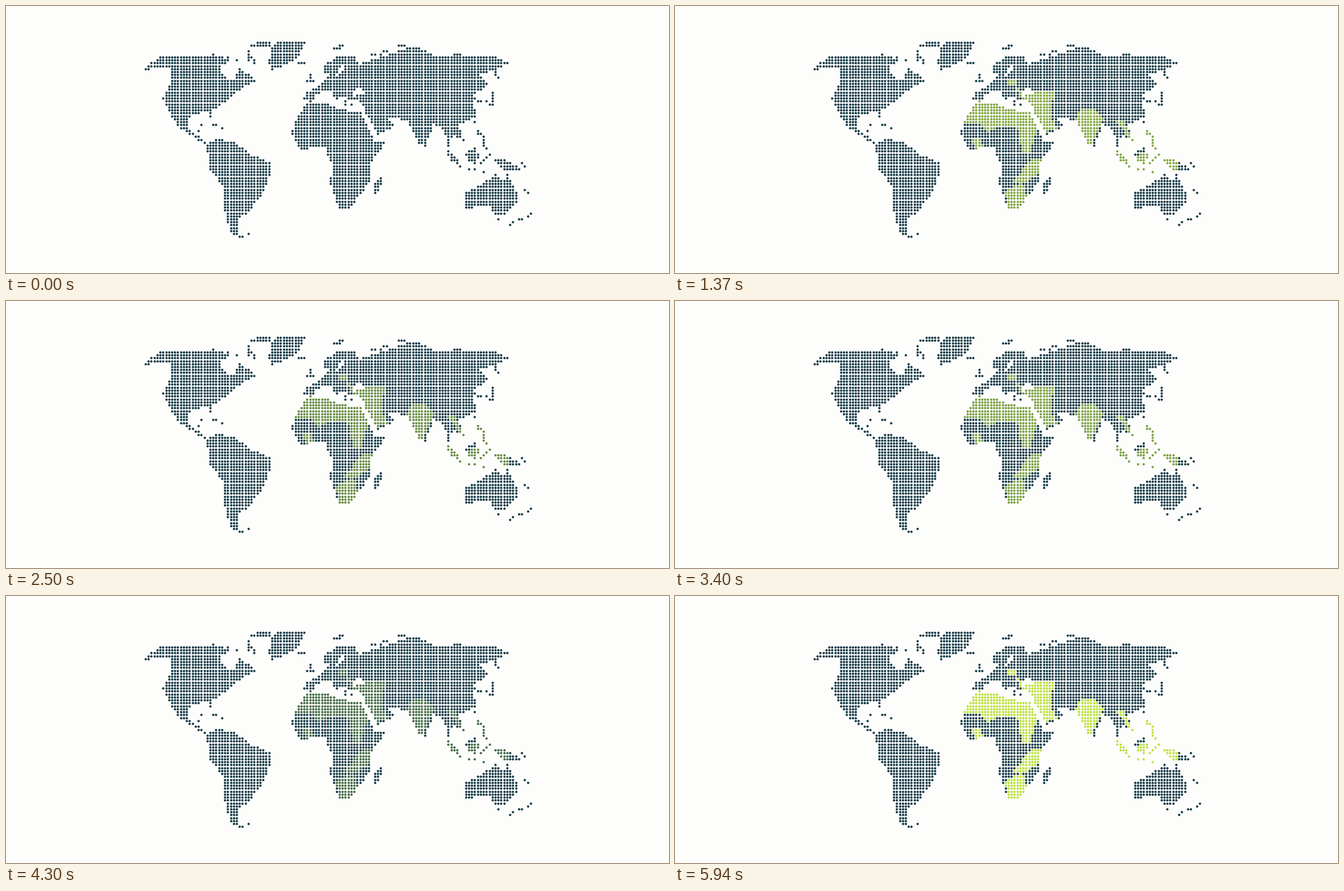
Write a matplotlib script that moves like this. It is 1179 px wide and 475 px high and loops after 5970 ms.

```python
import numpy as np
import matplotlib.pyplot as plt
from matplotlib.animation import FuncAnimation
from matplotlib.path import Path

W, H, DPI = 1179, 475, 100
STEP, FRAMES = 30, 199
COLS, ROWS = 132, 67
START = np.array([248, 64.6])
PITCH = np.array([5.227, 5.24])
DOT = 4.1

PAPER = "#fdfdfb"
DARK = np.array([15, 55, 69]) / 255
LIME = np.array([189, 225, 60]) / 255

rng = np.random.default_rng(4)
grid = np.stack(np.meshgrid(np.arange(COLS), np.arange(ROWS)), -1)
cells = grid.reshape(-1, 2).astype(float)
land = np.zeros(len(cells), bool)
lit = land.copy()


def fill(mask, *pts):
    """Mark the cells inside a polygon or touching its outline."""
    p = np.array(pts, float)
    if len(p) > 2:
        mask |= Path(p).contains_points(cells)
    for a, b in zip(p, np.roll(p, -1, axis=0)):
        d = b - a
        t = np.clip((cells - a) @ d / (d @ d), 0, 1)
        mask |= np.hypot(*(cells - a - t[:, None] * d).T) < 0.35


def isles(a, b, n, spread=0):
    """Scatter n single dots around the line from a to b."""
    spots = np.linspace(a, b, n) + rng.uniform(-spread, spread, (n, 2))
    for c, r in np.rint(spots).astype(int):
        land[r * COLS + c] = True


# North America
fill(land, (0, 9), (5, 5), (25, 5), (28, 6), (25, 8), (26, 12), (30, 13),
     (32, 9), (37, 13), (33, 15), (24, 22), (14, 25), (14, 29), (20, 34),
     (11, 28), (6, 19), (9, 14), (9, 8), (4, 8))
fill(land, (22, 23), (22, 25))
fill(land, (18, 30), (19, 28))
isles((23, 28), (26, 29), 3)
isles((34, 4), (37, 7), 10, 1)
isles((23, 4), (31, 6), 4)

# Greenland and Iceland
fill(land, (36, 1), (38, 0), (42, 0), (42, 1))
fill(land, (45, 0), (54, 0), (52, 4), (50, 6), (43, 9), (42, 7), (43, 2))
isles((52, 7), (54, 7), 3)

# South America
fill(land, (21, 35), (24, 33), (30, 34), (35, 38), (42, 41), (42, 44),
     (40, 50), (35, 57), (31, 60), (31, 64), (29, 64), (27, 56), (27, 49),
     (22, 43))
isles((30, 65), (33, 66), 4)
isles((35, 65), (35, 65), 1)

# Africa, Madagascar, Arabia
fill(land, (55, 21), (62, 21), (66, 23), (73, 24), (78, 34), (81, 34),
     (76, 41), (76, 47), (73, 51), (69, 56), (66, 56), (63, 47), (64, 42),
     (61, 35), (53, 36), (50, 31), (51, 27), (53, 24))
fill(land, (80, 46), (78, 48), (78, 51), (80, 48))
fill(land, (75, 23), (79, 31), (84, 28), (80, 24))

# Europe and Asia
fill(land, (65, 5), (71, 5), (72, 7), (67, 7), (64, 11), (61, 10), (61, 8))
fill(land, (72, 8), (84, 4), (89, 2), (93, 2), (96, 4), (100, 5), (119, 5),
     (123, 7), (113, 11), (116, 14), (111, 18), (112, 25), (106, 28),
     (108, 33), (104, 31), (103, 35), (102, 30), (98, 27), (95, 34), (93, 34),
     (89, 26), (75, 24), (74, 20), (70, 19), (76, 17), (72, 15), (69, 19),
     (62, 16), (58, 17), (56, 20), (54, 19), (55, 17), (58, 16), (62, 12),
     (67, 11), (68, 8))
fill(land, (55, 13), (56, 11), (57, 13))
isles((62, 17), (69, 21), 7, 1)
isles((95, 35), (95, 35), 1)

# Arctic and Pacific coasts
isles((64, 2), (67, 1), 5)
isles((77, 4), (82, 3), 5)
isles((86, 1), (88, 1), 3)
isles((105, 4), (107, 4), 3)
isles((118, 9), (120, 12), 7, 0.6)
fill(land, (118, 17), (118, 21))
isles((112, 19), (117, 21), 5)
isles((112, 27), (112, 27), 1)

# South-east Asia
fill(land, (103, 37), (106, 40), (106, 41), (104, 40))
fill(land, (109, 38), (112, 36), (113, 39), (112, 41), (110, 40))
fill(land, (119, 40), (122, 40), (127, 43), (122, 43))
isles((113, 30), (116, 35), 9, 0.7)
isles((107, 42), (115, 44), 4)
isles((114, 41), (117, 38), 4)
isles((128, 41), (129, 42), 2)

# Australia and New Zealand
fill(land, (109, 51), (115, 48), (119, 45), (122, 48), (123, 45), (126, 51),
     (126, 54), (122, 58), (119, 58), (117, 55), (109, 56))
isles((120, 60), (120, 60), 1)
isles((129, 50), (130, 51), 2)
isles((131, 58), (124, 62), 6)

# Pulsing countries
fill(lit, (66, 13), (68, 13), (68, 14), (66, 14))
fill(lit, (69, 16), (70, 17))
fill(lit, (70, 18), (76, 17), (81, 17), (80, 25), (82, 29), (78, 30), (75, 24))
fill(lit, (51, 27), (55, 20), (62, 21), (74, 24), (75, 30), (73, 37), (71, 37),
     (69, 28), (62, 28), (59, 30), (56, 27))
fill(lit, (54, 33), (56, 33), (57, 35), (55, 36))
fill(lit, (74, 40), (77, 40), (76, 44), (70, 48), (68, 47))
fill(lit, (68, 49), (71, 49), (72, 53), (69, 56), (66, 56), (65, 51))
fill(lit, (91, 23), (95, 23), (98, 26), (94, 34), (93, 34), (89, 26))
fill(lit, (103, 27), (105, 27), (108, 33), (104, 28))
fill(lit, (113, 30), (117, 30), (117, 36), (113, 36))
fill(lit, (103, 37), (107, 37), (107, 39), (117, 37), (123, 37), (123, 44),
     (103, 44))

fig = plt.figure(figsize=(W / DPI, H / DPI), dpi=DPI, facecolor=PAPER)
ax = fig.add_axes([0, 0, 1, 1])
ax.set(xlim=(0, W), ylim=(H, 0))
ax.axis("off")


def plot(mask):
    x, y = (START + cells[mask] * PITCH).T
    return ax.scatter(x, y, s=(DOT * 72 / DPI) ** 2, color=[DARK], linewidths=0)


plot(land & ~lit)
pulse = plot(land & lit)


def level(t):
    """Linear one-second swings up and down, then full brightness."""
    return 1.0 if t >= 5 else 1 - abs(t % 2 - 1)


def draw(i):
    k = level(i * STEP / 1000)
    pulse.set_facecolor([DARK + (LIME - DARK) * k])
    return (pulse,)


anim = FuncAnimation(fig, draw, frames=FRAMES, interval=STEP,
                     repeat=True, repeat_delay=0, blit=False)
plt.show()
```
